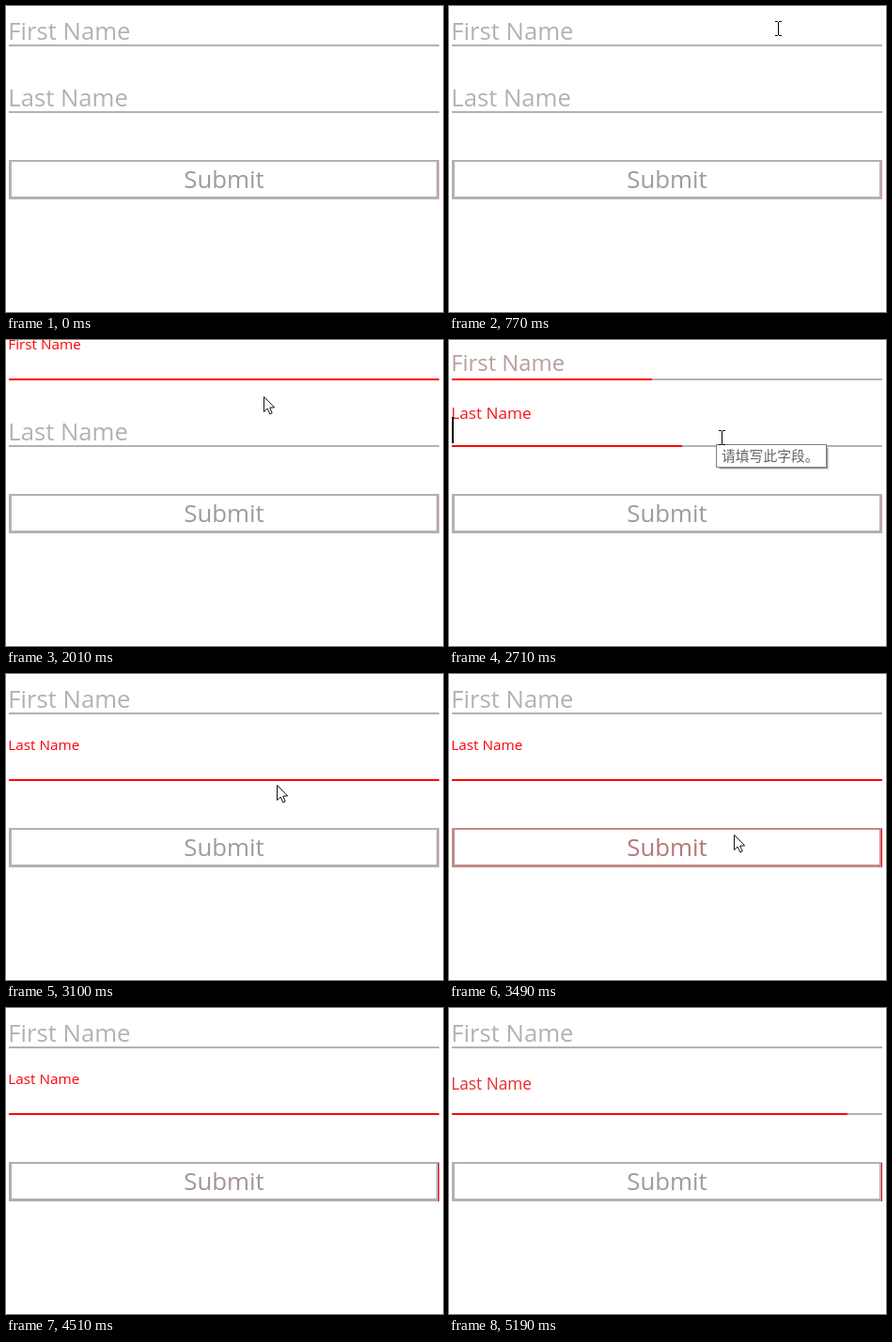
Recreate the animation shown at these times as an HTML page with a canvas. Size 465 by 326 pixels, loop 5280 ms.

```html
<!DOCTYPE html>
<html lang="zh-CN">
<head>
<meta charset="utf-8">
<title>Form</title>
<style>
html, body { margin: 0; width: 100%; height: 100%; overflow: hidden; background: #fff; }
canvas { display: block; width: 465px; height: 326px; }
</style>
</head>
<body>
<canvas id="stage"></canvas>
<script>
const W = 465, H = 326, LOOP = 5280, STEPS = 68, BLINK = 530;
const FONT = '"Open Sans", "Noto Sans", sans-serif';
const CJK = '"Noto Sans CJK SC", "Noto Sans CJK", sans-serif';
const GRAY = [178, 178, 178], DIM = [160, 154, 158], RED = [255, 0, 0], PINK = [236, 150, 150];

const canvas = document.getElementById('stage');
const ctx = canvas.getContext('2d');
const dpr = window.devicePixelRatio || 1;
canvas.width = W * dpr;
canvas.height = H * dpr;

const rows = [
  { text: 'First Name', y: 0, on: 1130, off: 2562 },
  { text: 'Last Name', y: 71, on: 2562, off: 5157 }
];
const hover = { on: 3410, off: 4130 };
const tip = { on: 2620, off: 3090 };

// Pointer stops
const stops = [
  { t: 530, x: 456, y: 16 }, { t: 1000, x: 253, y: 32 }, { t: 1780, x: 253, y: 32 },
  { t: 2010, x: 274, y: 59 }, { t: 2320, x: 290, y: 104 }, { t: 3020, x: 290, y: 104 },
  { t: 3100, x: 288, y: 117 }, { t: 3570, x: 306, y: 181 }, { t: 4030, x: 306, y: 181 },
  { t: 4190, x: 371, y: 223 }, { t: 4500, x: 442, y: 326 }
];

const clamp = v => Math.min(1, Math.max(0, v));
const mix = (a, b, k) => a + (b - a) * k;
const color = (a, b = a, k = 0) => `rgb(${a.map((v, i) => Math.round(mix(v, b[i], k))).join(',')})`;
const within = (t, span) => t >= span.on && t < span.off;

// The screen refreshes on a regular beat
function snap(t) {
  const beat = LOOP / STEPS;
  return Math.min(STEPS - 1, Math.floor(t / beat + .18)) * beat;
}

// cubic-bezier(.25, .1, .25, 1)
function ease(x) {
  if (x <= 0 || x >= 1) return clamp(x);
  const bez = (p, q, s) => 3 * p * s * (1 - s) ** 2 + 3 * q * s * s * (1 - s) + s ** 3;
  let lo = 0, hi = 1;
  for (let i = 0; i < 24; i++) {
    const mid = (lo + hi) / 2;
    if (bez(.25, .25, mid) < x) lo = mid; else hi = mid;
  }
  return bez(.1, 1, lo);
}

const progress = (t, span, ms) => ease((t - span.on) / ms) * (1 - ease((t - span.off) / ms));

function rect(x, y, w, h, fill) {
  ctx.fillStyle = fill;
  ctx.fillRect(x, y, w, h);
}

function label(text, x, y, size, fill, align = 'left', family = FONT) {
  ctx.font = `${size}px ${family}`;
  ctx.textAlign = align;
  ctx.fillStyle = fill;
  ctx.fillText(text, x, y);
}

function field(row, t) {
  const lift = progress(t, row, 260), shrink = progress(t, row, 300), line = progress(t, row, 500);
  label(row.text, 2.3, row.y + 35.8 - 26.3 * lift, mix(25.7, 15.3, shrink), color(GRAY, RED, lift));
  rect(3, row.y + 41, 458, 2, color(GRAY));
  if (t < row.on) rect(460, row.y + 41, 1, 2, color(PINK));
  rect(3, row.y + 41, 458 * line, 2, color(RED));
  const lit = Math.floor((t - row.on) / BLINK) % 2 === 0;
  if (within(t, row) && lit) rect(3, row.y + 11, 2, 28, '#000');
}

function button(t) {
  const k = progress(t, hover, 500);
  rect(3, 164, 458, 42, color(GRAY, RED, k));
  rect(6, 166, 452, 37, '#fff');
  rect(460, 165, 1, 41, color(t < hover.on ? PINK : RED));
  label('Submit', 232, 194, 25.8, color(DIM, RED, k), 'center');
}

function tooltip() {
  rect(288, 115, 116, 23, 'rgba(0,0,0,.16)');
  rect(287, 114, 116, 23, 'rgba(0,0,0,.28)');
  rect(284, 111, 118, 25, '#808080');
  rect(285, 112, 116, 23, '#fff');
  label('请填写此字段。', 290, 128.8, 14.8, '#666', 'left', CJK);
}

function arrow(x, y) {
  ctx.save();
  ctx.translate(x, y);
  ctx.fillStyle = '#fff';
  ctx.strokeStyle = '#111';
  ctx.lineWidth = 1;
  const shape = new Path2D('M.5 .5v16l3.7-3.4 2.6 5.8 2.4-1.1-2.5-5.7 5-.2z');
  ctx.fill(shape);
  ctx.stroke(shape);
  ctx.restore();
}

function beam(x, y) {
  rect(x, y - 7, 1, 14, '#000');
  for (const end of [-8, 7]) {
    rect(x - 3, y + end, 3, 1, '#000');
    rect(x + 1, y + end, 3, 1, '#000');
  }
}

function pointer(t) {
  const i = stops.findIndex(s => s.t > t);
  if (i < 1) return;
  const a = stops[i - 1], b = stops[i];
  const k = (t - a.t) / (b.t - a.t);
  const x = Math.round(mix(a.x, b.x, k)), y = Math.round(mix(a.y, b.y, k));
  const inField = rows.some(r => y >= r.y + 11 && y <= r.y + 43);
  (inField ? beam : arrow)(x, y);
}

function draw(t) {
  ctx.setTransform(dpr, 0, 0, dpr, 0, 0);
  rect(0, 0, W, H, '#fff');
  rows.forEach(row => field(row, t));
  button(t);
  if (within(t, tip)) tooltip();
  pointer(t);
}

const start = performance.now();
function tick() {
  draw(snap((performance.now() - start) % LOOP));
  requestAnimationFrame(tick);
}
tick();
</script>
</body>
</html>
```
